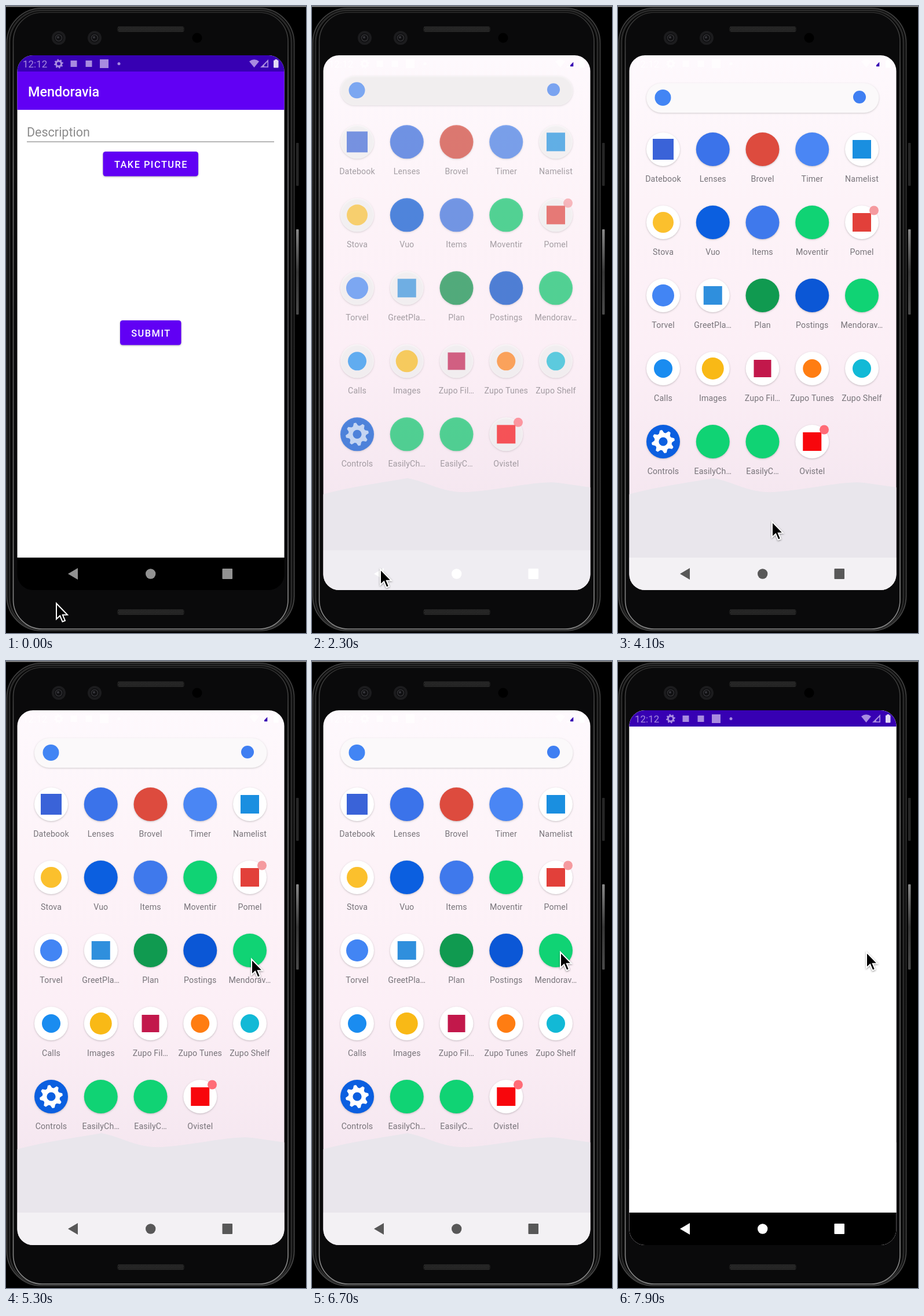
These frames come from a looping animation (518x1081 px, 8 s). An HTML page with a canvas:

```html
<!DOCTYPE html>
<html lang="en">
<head>
<meta charset="utf-8">
<title>App launcher</title>
<style>
html, body { margin: 0; width: 100%; height: 100%; overflow: hidden; background: #000; }
canvas { display: block; width: 518px; height: 1081px; }
</style>
</head>
<body>
<canvas width="518" height="1081"></canvas>
<script>
const c = document.querySelector('canvas').getContext('2d');
const LOOP = 8000, STEP = 100;
const PURPLE = '#6100f4', DARK_PURPLE = '#3700b3', GREEN = '#10d374';
const SCREEN = { x: 19.5, y: 85, w: 461, h: 922, r: 27 };
const APP = 'Mendoravia';

// label, disc colour, shape inside the disc: kind, colour, size
const ICONS = [
  ['Datebook', '#fff', 'square', '#3a63d8', 36], ['Lenses', '#3b73ea'], ['Brovel', '#dd4b3e'],
  ['Timer', '#4a86f4'], ['Namelist', '#fff', 'square', '#1a8fe0', 32],
  ['Stova', '#fff', 'circle', '#fbc02d', 36], ['Vuo', '#0b5fe0'], ['Items', '#3f79ec'],
  ['Moventir', GREEN], ['Pomel', '#fff', 'square', '#e2403a', 32],
  ['Torvel', '#fff', 'circle', '#4285f4', 38], ['GreetPla…', '#fff', 'square', '#2f8fdd', 32],
  ['Plan', '#109a50'], ['Postings', '#0b57d6'], [APP.slice(0, 8) + '…', GREEN],
  ['Calls', '#fff', 'circle', '#1a8cf0', 32], ['Images', '#fff', 'circle', '#f9b916', 38],
  ['Zupo Fil…', '#fff', 'square', '#c2184b', 30], ['Zupo Tunes', '#fff', 'circle', '#ff7d12', 32],
  ['Zupo Shelf', '#fff', 'circle', '#12b9d6', 32],
  ['Controls', '#0b5fe0', 'gear', '#fff', 40], ['EasilyCh…', GREEN], ['EasilyC…', GREEN],
  ['Ovistel', '#fff', 'square', '#f8060c', 32]
];

// time, x, y of the pointer tip
const POINTER = [
  [300, 86, 1029], [800, 117, 970], [2800, 117, 970], [3600, 262, 905], [4100, 265, 888],
  [4500, 272, 904], [5200, 423, 513], [5700, 423, 513], [6300, 428, 501]
];

const clamp = v => Math.max(0, Math.min(1, v));
const phase = (t, from, to) => clamp((t - from) / (to - from));
const mix = (a, b, p) => a + (b - a) * p;
const smooth = p => p * p * (3 - 2 * p);

function rect(x, y, w, h, fill) {
  c.fillStyle = fill;
  c.fillRect(x, y, w, h);
}

function round(x, y, w, h, r, fill, stroke, line = 1) {
  c.beginPath();
  c.roundRect(x, y, w, h, r);
  if (fill) { c.fillStyle = fill; c.fill(); }
  if (stroke) { c.strokeStyle = stroke; c.lineWidth = line; c.stroke(); }
}

function circle(x, y, r, fill) {
  c.beginPath();
  c.arc(x, y, r, 0, 7);
  c.fillStyle = fill;
  c.fill();
}

function poly(points, fill) {
  c.beginPath();
  points.forEach(([x, y]) => c.lineTo(x, y));
  c.closePath();
  c.fillStyle = fill;
  c.fill();
}

function text(s, x, y, size, fill, { weight = 400, align = 'left', gap = 0 } = {}) {
  c.font = `${weight} ${size}px Roboto, sans-serif`;
  c.letterSpacing = gap + 'px';
  c.textAlign = align;
  c.fillStyle = fill;
  c.fillText(s, x, y);
}

function gradient(y0, y1, ...colours) {
  const g = c.createLinearGradient(0, y0, 0, y1);
  colours.forEach((col, i) => g.addColorStop(i / (colours.length - 1), col));
  return g;
}

function shadow(colour, blur, dy) {
  c.shadowColor = colour;
  c.shadowBlur = blur;
  c.shadowOffsetY = dy;
}

function group(draw) {
  c.save();
  draw();
  c.restore();
}

function gear(x, y, r, fill) {
  group(() => {
    c.translate(x, y);
    c.beginPath();
    for (let i = 0; i < 32; i++) {
      const a = (i - 1.5) * Math.PI / 16;
      const d = i % 4 < 2 && i % 4 >= 0 ? r : r * 0.76;
      if (Math.floor(i / 2) % 8 !== 7 || true) c.lineTo(d * Math.cos(a), d * Math.sin(a));
    }
    c.closePath();
    c.moveTo(r * 0.38, 0);
    c.arc(0, 0, r * 0.38, 0, 7);
    c.fillStyle = fill;
    c.fill('evenodd');
  });
}

function speaker(y) {
  round(192, y, 116, 10, 4, '#1b1b1b');
  group(() => {
    c.strokeStyle = '#3a3a3a';
    c.setLineDash([1.3, 1.3]);
    for (let i = 0; i < 4; i++) {
      c.lineDashOffset = i % 2 * 1.3;
      c.beginPath();
      c.moveTo(194, y + 1.5 + i * 2.3);
      c.lineTo(306, y + 1.5 + i * 2.3);
      c.stroke();
    }
  });
}

function lens(x) {
  circle(x, 55, 12, '#1c1c1e');
  circle(x, 55, 8, '#101012');
  c.beginPath();
  c.arc(x, 55, 5.5, 0, 7);
  c.strokeStyle = '#303033';
  c.lineWidth = 1.5;
  c.stroke();
  circle(x - 1, 54, 2, '#36363c');
}

function body() {
  rect(0, 0, 518, 1081, '#000');
  rect(0, 0, 518, 1.5, '#969696');
  round(501, 236, 4.5, 74, 1, '#262626');
  round(501, 385, 4.5, 147, 1, gradient(385, 532, '#8a8a8a', '#383838', '#4a4a4a'));
  round(1.5, 4, 496, 1073, 60, '#050505', gradient(4, 1077, '#3c3c3c', '#2a2a2a', '#444'), 2);
  round(6, 7.5, 487, 1068, 56, null, '#292929', 3);
  round(12.5, 11, 474.5, 1063, 50, '#0a0a0b',
    gradient(11, 1074, '#303030', '#757575', '#555', '#666', '#858585'), 1.7);
  lens(91);
  lens(153);
  circle(330, 55, 8.5, '#000');
  speaker(35);
  speaker(1040);
}

function statusIcons(colour, battery) {
  text('12:12', 29, 105.5, 17, colour);
  gear(91, 99.5, 8, colour);
  rect(111.5, 94, 11, 11, colour);
  rect(137.5, 94, 11, 11, colour);
  rect(162, 92, 15, 15, colour);
  circle(195, 99.5, 2.5, colour);
  c.beginPath();
  c.moveTo(428.5, 106);
  c.lineTo(420, 95.5);
  c.quadraticCurveTo(428.5, 89, 437, 95.5);
  c.fillStyle = colour;
  c.fill();
  poly([[439, 106], [453, 106], [453, 92]], colour);
  poly([[446, 104.3], [451.3, 104.3], [451.3, 96.5], [446, 102]], DARK_PURPLE);
  round(462, 93.5, 8.5, 13, 1, battery);
  rect(464.3, 92, 4, 2, battery);
}

function navIcons(colour) {
  poly([[107, 979], [124, 969], [124, 989]], colour);
  circle(249.7, 979, 8.7, colour);
  round(373.5, 970, 17.5, 18, 1, colour);
}

function button(label, x, y, w) {
  group(() => {
    shadow('rgba(0,0,0,.3)', 3, 1);
    round(x, y, w, 42.5, 4.5, PURPLE);
  });
  text(label, x + w / 2 + 0.7, y + 27.5, 16.4, '#fff', { weight: 500, align: 'center', gap: 1.46 });
}

function blankApp() {
  rect(19, 85, 462, 866, '#fff');
  rect(19, 85, 462, 28, DARK_PURPLE);
  rect(19, 951, 462, 56, '#000');
  statusIcons('#a88be0', '#e2d9f5');
}

function form() {
  blankApp();
  rect(19, 113, 462, 66, PURPLE);
  text(APP, 38, 155.5, 23.4, '#fff', { weight: 500 });
  text('Description', 36, 225, 21.5, '#8b8b8b');
  rect(36, 233.5, 427, 1.2, '#868686');
  button('TAKE PICTURE', 167.5, 251, 164.5);
  button('SUBMIT', 197, 542, 105.5);
}

function wallpaper() {
  rect(19, 85, 462, 922, gradient(85, 850, '#fef9fd', '#fdf3f8', '#fceff6', '#f5e7f0'));
  c.beginPath();
  c.moveTo(19, 842);
  c.bezierCurveTo(60, 830, 120, 822, 165, 814);
  c.bezierCurveTo(205, 822, 225, 840, 270, 838);
  c.bezierCurveTo(330, 834, 390, 818, 425, 822);
  c.lineTo(481, 830);
  c.lineTo(481, 1007);
  c.lineTo(19, 1007);
  c.fillStyle = '#e9e6ec';
  c.fill();
  statusIcons('rgba(255,255,255,.75)', '#fff');
}

function icon([label, disc, kind, colour, size], i) {
  const x = 78 + i % 5 * 85.75, y = 247 + Math.floor(i / 5) * 126;
  group(() => {
    shadow('rgba(0,0,0,.22)', 3, 1);
    circle(x, y, 29, disc);
  });
  if (kind === 'square') rect(x - size / 2, y - size / 2, size, size, colour);
  if (kind === 'circle') circle(x, y, size / 2, colour);
  if (kind === 'gear') gear(x, y, size / 2, colour);
  text(label, x, y + 56, 14.2, '#78747a', { align: 'center', gap: 0.15 });
}

function launcher(dy, alpha) {
  group(() => {
    c.globalAlpha = alpha;
    c.translate(0, dy);
    rect(19, 951, 462, 56 - dy, 'rgba(255,255,255,.42)');
    group(() => {
      shadow('rgba(0,0,0,.18)', 3, 1);
      round(49, 133, 401.5, 51, 25.5, '#fbf9fa');
    });
    circle(77.5, 158, 14, '#4285f4');
    circle(417, 157, 11, '#3f7ff2');
    ICONS.forEach(icon);
    circle(442, 352.5, 8, '#f59a9f');
    circle(356, 730.5, 8, '#ff6c77');
  });
}

// Closing: the form sinks and fades while the launcher drops into place.
function closing(t) {
  const rest = (1 - phase(t, 2000, 2500)) ** 1.2;
  wallpaper();
  launcher(-38 * rest, 1 - rest);
  const fade = 1 - phase(t, 2000, 2200);
  if (fade > 0) group(() => {
    c.globalAlpha = fade;
    c.translate(0, 38 * (1 - rest));
    form();
  });
  const grey = Math.round(mix(255, 88, phase(t, 2300, 2500)));
  navIcons(`rgb(${grey},${grey},${grey})`);
}

// Opening: the blank window grows out of the tapped icon.
function opening(t) {
  const p = 1 - (1 - phase(t, 7400, 7800)) ** 2;
  const x = mix(392, 19, p), y = mix(470, 85, p);
  const w = mix(58, 462, p), h = mix(58, 922, p);
  wallpaper();
  launcher(0, 1 - p);
  group(() => {
    c.beginPath();
    c.roundRect(x, y, w, h, mix(29, 0, p));
    c.clip();
    c.globalAlpha = clamp(p * 2);
    blankApp();
  });
  navIcons(p > 0.6 ? '#fff' : '#585858');
}

function screen(t) {
  group(() => {
    c.beginPath();
    c.roundRect(SCREEN.x, SCREEN.y, SCREEN.w, SCREEN.h, SCREEN.r);
    c.clip();
    if (t <= 2000) {
      form();
      navIcons(t < 1900 ? '#929292' : '#fff');
    } else if (t <= 7400) closing(t);
    else opening(t);
  });
}

function pointer(t) {
  let [, x, y] = POINTER[0];
  for (let i = 1; i < POINTER.length; i++) {
    const [t0] = POINTER[i - 1], [t1, x1, y1] = POINTER[i];
    const p = smooth(phase(t, t0, t1));
    x = mix(x, x1, p);
    y = mix(y, y1, p);
  }
  group(() => {
    c.translate(x + 1, y + 1);
    shadow('rgba(0,0,0,.35)', 3, 1);
    poly([[0, 0], [0, 27], [6.2, 21.3], [10.5, 31.5], [15, 29.6], [10.8, 19.8], [19, 19.5]], '#000');
    c.lineWidth = 2;
    c.strokeStyle = '#fff';
    c.stroke();
  });
}

function frame() {
  const t = Math.floor(performance.now() % LOOP / STEP) * STEP;
  body();
  screen(t);
  pointer(t);
  requestAnimationFrame(frame);
}
frame();
</script>
</body>
</html>
```
